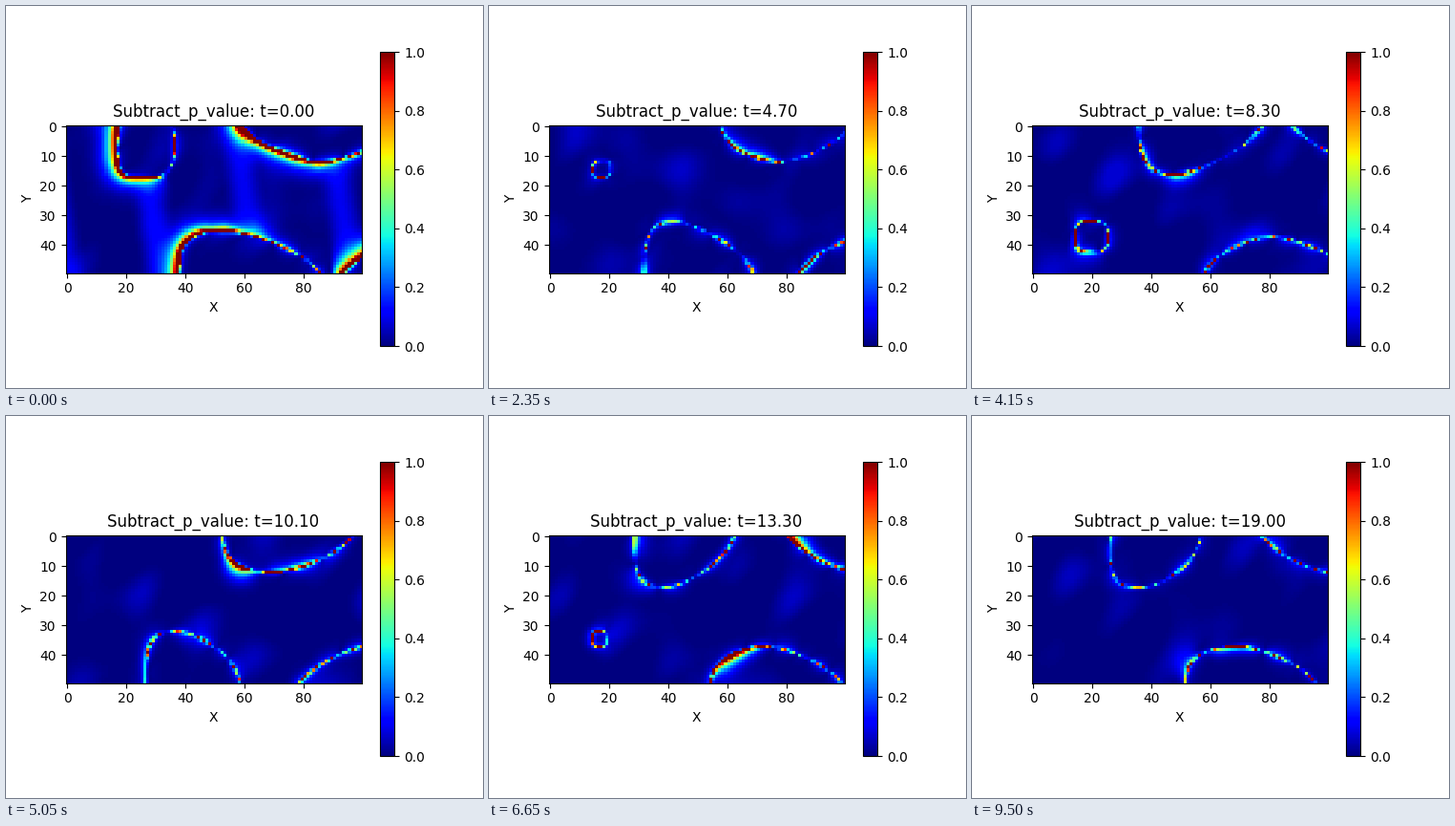
Animation of 500 by 400 pixels, one loop 9.55 s. Source, as a matplotlib script:

```python
import numpy as np
import matplotlib.pyplot as plt
from matplotlib.animation import FuncAnimation
from matplotlib.path import Path

NX, NY = 100, 50
FRAMES, DT = 191, 0.1
PERIOD = 6.0
FIRST_TOP, FIRST_BOTTOM = -7.8, -10.8
SPEED = 8.6
rng = np.random.default_rng(11)

X, Y = np.meshgrid(np.arange(NX), np.arange(NY))
CELLS = np.column_stack([X.ravel(), Y.ravel()])
Z = (X + 1j * Y).ravel().astype(np.complex64)[:, None]
THETA = np.linspace(0, 2 * np.pi, 73)


def bell(x, centre, width):
    return np.exp(-((x - centre) / width)**2)


def fall(x, centre, rate):
    """Smooth step from 1 down to 0."""
    return 1 / (1 + np.exp(rate * (x - centre)))


def vortex(age):
    """Zero-pressure contour as x and depth below the wall.

    A lopsided superellipse is born as a small ring, opens at the wall,
    then drifts downstream while its upstream face flattens.
    """
    front = max(14, 1.5 + SPEED * age)
    lag = 11 * bell(age, 7, 2.5) * np.cos(np.pi * (age - 1.7) / 3)**4
    left = front - lag
    right = front + 5 + 39 * (1 - bell(age, 0, 2.7))
    peak = left + (right - left) * (0.5 - 0.2 * bell(age, 4, 2))

    depth = 12 + 5 * fall(age, 4.6, 2.5)
    centre = 15 * np.exp(-(age / 1.9)**3) - 0.5
    cos, sin = np.cos(THETA), np.sin(THETA)
    down = cos >= 0
    power = 2 / np.where(down, 1.4 + 2 * fall(age, 2.3, 4),
                         1.3 + 2 * fall(age, 5.8, 1.5))
    width = np.where(down, right - peak, peak - left)
    x = peak + width * np.sign(cos) * np.abs(cos)**power
    d = centre + (depth - centre) * np.sign(sin) * np.abs(sin)**power
    return x, d


def contours(t):
    for first in (FIRST_TOP, FIRST_BOTTOM):
        for birth in np.arange(first, 20, PERIOD):
            if 0.1 < t - birth < 11:
                x, d = vortex(t - birth)
                yield x, d if first == FIRST_TOP else NY - 1 - d


def distance(x, y):
    """Distance of every cell to the part of the curve near the stage."""
    c = (x + 1j * y).astype(np.complex64)
    a, s = c[:-1], np.diff(c)
    keep = (a.real < NX + 3) & (a.imag > -3) & (a.imag < NY + 2)
    a, s = a[keep], s[keep]
    w = Z - a
    u = np.clip((w * s.conj()).real / (np.abs(s)**2 + 1e-6), 0, 1)
    r = w - u * s
    return np.sqrt((r.real**2 + r.imag**2).min(axis=1)).reshape(NY, NX)


def make_noise(n, shortest, longest):
    """Drifting smooth noise: a sum of n random plane waves."""
    k = 2 * np.pi / rng.uniform(shortest, longest, n)
    angle, phase = rng.uniform(0, 2 * np.pi, (2, n))
    rate = rng.uniform(-2, 2, n)

    def noise(t):
        waves = (np.sin(q * np.cos(g) * (X - SPEED * t) + q * np.sin(g) * Y
                        + p + r * t)
                 for q, g, p, r in zip(k, angle, phase, rate))
        return sum(waves) / np.sqrt(n)

    return noise


line_noise = make_noise(6, 12, 35)
glow_noise = make_noise(6, 22, 45)
haze_noise = make_noise(7, 18, 45)


def field(t):
    dist = np.full((NY, NX), 99.0)
    inside = np.zeros((NY, NX), bool)
    for x, y in contours(t):
        dist = np.minimum(dist, distance(x, y))
        outline = Path(np.column_stack([x, y]))
        inside |= outline.contains_points(CELLS).reshape(NY, NX)
    signed = np.where(inside, dist, -dist)
    upstream = np.clip(0.35 + 0.65 * np.gradient(signed, axis=1), 0, 1)
    start = bell(t, 0, 0.5)

    # The glow lies on one side of the contour, chosen by the noise sign.
    line = (0.01 + 0.1 * np.abs(line_noise(t))) * bell(dist, 0, 4)
    glow = glow_noise(t)
    same_side = np.clip(glow * np.sign(signed), 0, 2)
    err = line + 0.5 * same_side**2 * upstream * bell(dist, 0, 6)
    err += 1.5 * start * ~inside * upstream * bell(dist, 0, 7)

    haze = 0.025 * np.clip(haze_noise(t), 0, 2)**1.5
    bands = np.clip(np.cos(2 * np.pi * (X - 60 - 0.15 * (Y - 25)) / 32), 0, 1)
    haze += 0.1 * start * ~inside * bands**2
    return err / (dist + 0.02) + haze


fig, ax = plt.subplots(figsize=(5, 4), dpi=100)
image = ax.imshow(field(0), cmap="jet", vmin=0, vmax=1,
                  interpolation="nearest")
fig.colorbar(image)
ax.set_xlabel("X")
ax.set_ylabel("Y")
title = ax.set_title("Subtract_p_value: t=0.00")


def update(i):
    t = i * DT
    image.set_data(field(t))
    title.set_text(f"Subtract_p_value: t={t:.2f}")
    return image, title


anim = FuncAnimation(fig, update, frames=FRAMES, interval=50,
                     repeat=True, repeat_delay=0)
plt.show()
```
